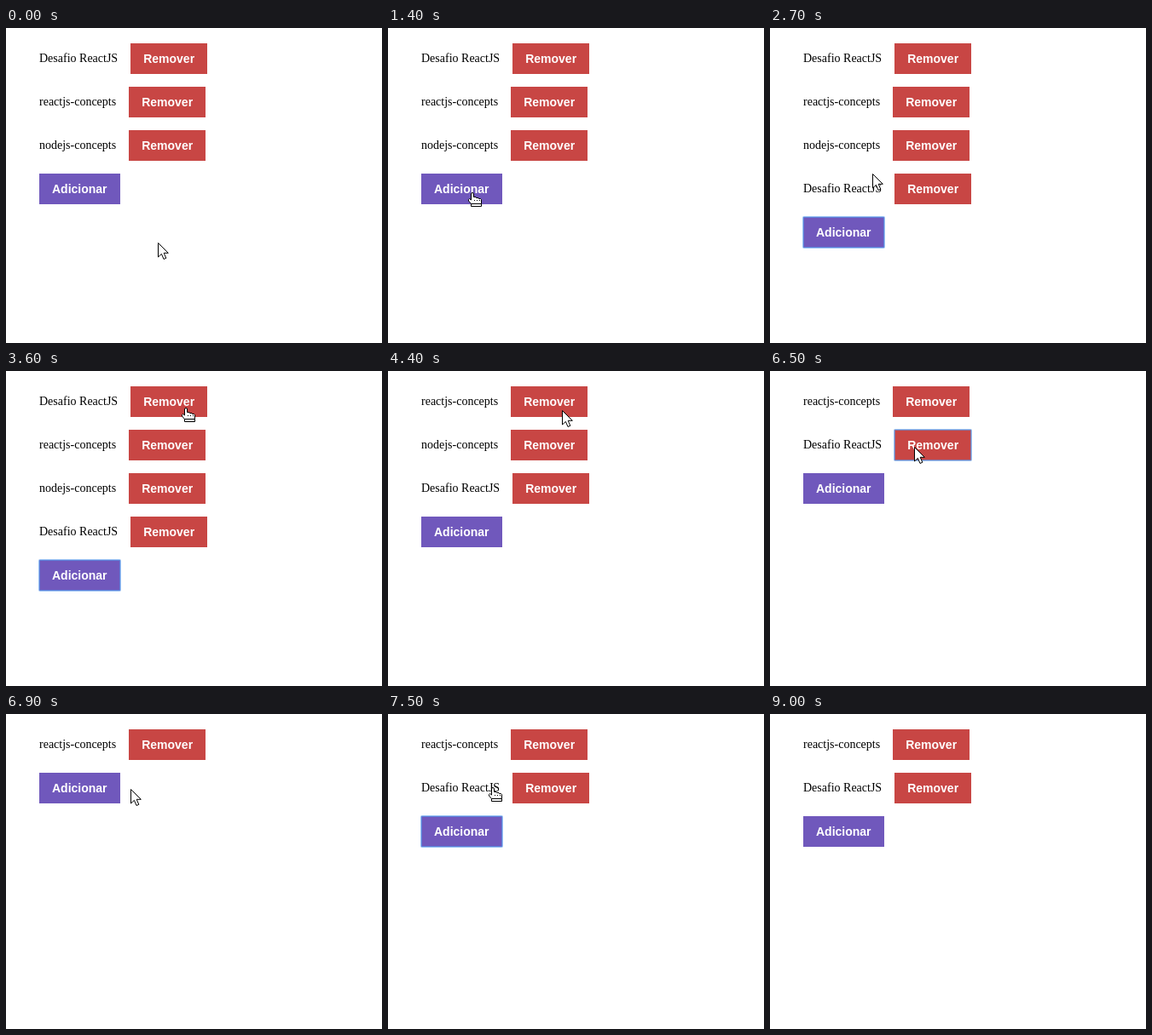
These frames come from a looping animation (441x370 px, 9.1 s). An HTML page:

```html
<!DOCTYPE html>
<html lang="pt">
<head>
<meta charset="utf-8">
<style>
  html, body { margin: 0; width: 100%; height: 100%; overflow: hidden; background: #fff; }
  #app { position: absolute; left: 39px; top: 18px; }
  .row { display: flex; align-items: flex-start; height: 36px; margin-bottom: 15px; white-space: nowrap; }
  .row span { font: 14px/15px "Liberation Serif", serif; margin: 10px 15px 0 0; color: #000; }
  .btn { padding: 10px 15px; font: bold 14px/16px "Liberation Sans", sans-serif; color: #fff; background: #c84644; }
  .add { background: #7058bc; }
  .focus { --ring: rgba(84, 152, 236, .6); border-radius: 1px; box-shadow: 0 0 0 1px var(--ring), inset 0 0 0 1px var(--ring); }
  svg { position: absolute; left: 0; top: 0; overflow: visible; }
  path { fill: #fff; stroke: #000; stroke-linejoin: round; }
</style>
</head>
<body>
<div id="app"></div>
<svg id="pointer" width="20" height="22">
  <path id="arrow" d="M.5 .5V17L4.4 13.4L7 19.5L9.8 18.3L7.2 12.3H12.3Z"/>
  <g id="hand" transform="translate(-5 0)">
    <path d="M3.5 9V2Q3.5 .5 5 .5T6.5 2V5.5H9L9.5 6.5H12L12.5 7.5H14.5L15.5 8.5V13.5H3.5L.5 10V8.5L1.5 7.5Z"/>
    <path d="M3.5 13.5H15.5V16.5H3.5Z"/>
    <path d="M7 9.5H14" stroke-dasharray="1 2"/>
  </g>
</svg>
<script>
const LOOP = 9100, STEP = 100;
const TOP = 18, PITCH = 51, HEIGHT = 36;
const $ = id => document.getElementById(id);

const NEW = "Desafio ReactJS";
const initial = { items: [NEW, "reactjs-concepts", "nodejs-concepts"], focus: -1 };

// The focus index after the last item means the "Adicionar" button.
const add = ({ items }) => ({ items: [...items, NEW], focus: items.length + 1 });
const remove = i => ({ items }) => ({ items: items.filter((_, j) => j !== i), focus: -1 });
const focusOn = i => ({ items }) => ({ items, focus: i });

const actions = [
  [1600, add], [3900, remove(0)], [5100, remove(1)], [6500, focusOn(1)],
  [6700, remove(1)], [7500, add], [9000, focusOn(-1)]
];

// Each move: start, end, hot spot reached, shape while resting there
const moves = [
  [0, 0, 178, 252, "arrow"],
  [500, 900, 100, 198, "hand"],
  [1000, 1400, 99, 193, "hand"],
  [2600, 2900, 161, 128, "arrow"],
  [3000, 3600, 211, 43, "hand"],
  [4200, 4400, 204, 46, "arrow"],
  [4500, 5000, 196, 83, "hand"],
  [5400, 5800, 95, 125, "hand"],
  [5900, 6400, 169, 89, "arrow"],
  [6700, 7100, 123, 86, "hand"],
  [8100, 8700, 53, -10, "arrow"]
];

const stateAt = t => actions.filter(([at]) => at <= t).reduce((state, [, act]) => act(state), initial);

function overButton(count, x, y) {
  const row = Math.floor((y - TOP) / PITCH);
  if (row < 0 || row > count || y - TOP - row * PITCH >= HEIGHT) return false;
  return row < count ? x >= 145 && x < 235 : x >= 39 && x < 134;
}

function pointerAt(t, count) {
  const i = moves.findLastIndex(([from]) => from <= t);
  const [from, to, x1, y1, rest] = moves[i];
  if (t >= to) return { x: x1, y: y1, shape: rest };
  const [, , x0, y0] = moves[i - 1];
  const k = (t - from) / (to - from);
  const x = Math.round(x0 + (x1 - x0) * k), y = Math.round(y0 + (y1 - y0) * k);
  const hand = k ? overButton(count, x, y) : moves[i - 1][4] === "hand";
  return { x, y, shape: hand ? "hand" : "arrow" };
}

const button = (label, focused, kind = "") =>
  `<div class="btn ${kind} ${focused ? "focus" : ""}">${label}</div>`;

let shown;
function showList({ items, focus }) {
  const rows = items.map((name, i) => `<span>${name}</span>` + button("Remover", i === focus));
  rows.push(button("Adicionar", focus === items.length, "add"));
  const html = rows.map(row => `<div class="row">${row}</div>`).join("");
  if (html !== shown) $("app").innerHTML = shown = html;
}

function draw(now) {
  const t = Math.floor(now % LOOP / STEP) * STEP;
  const state = stateAt(t);
  showList(state);
  const { x, y, shape } = pointerAt(t, state.items.length);
  $("pointer").style.transform = `translate(${x}px, ${y}px)`;
  $("pointer").style.display = y < 0 ? "none" : "";
  for (const id of ["arrow", "hand"]) $(id).style.display = id === shape ? "" : "none";
}

const start = performance.now();
function tick() {
  draw(performance.now() - start);
  requestAnimationFrame(tick);
}
tick();
</script>
</body>
</html>
```
